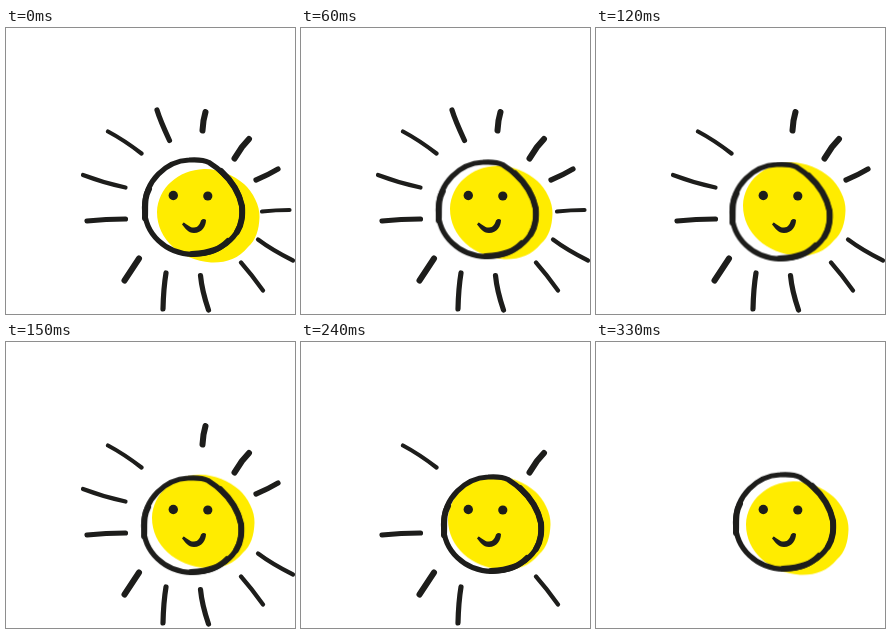
Recreate the animation shown at these times as an HTML page. Size 289 by 286 pixels, loop 360 ms.

```html
<!DOCTYPE html>
<html lang="en">
<head>
<meta charset="utf-8">
<title>Smiling sun</title>
<style>
  html, body { margin: 0; width: 100%; height: 100%; overflow: hidden; background: #fff; }
  svg { display: block; width: 100%; height: 100%; }

  .ink { fill: none; stroke: #1d1d1b; stroke-linecap: round; stroke-linejoin: round; }
  .thin { stroke-width: 4.2; }
  .bold { stroke-width: 5.2; }
  .heavy { stroke-width: 6; }

  .disc { fill: #ffec00; animation: disc 360ms infinite steps(6); }
  .ring { animation: ring 360ms infinite steps(4); }
  .short { animation: short 360ms infinite step-end; }
  .medium { animation: medium 360ms infinite step-end; }
  .long { animation: long 360ms infinite step-end; }

  @keyframes disc {
    0%, 100% { transform: translate(0, 0); }
    50% { transform: translate(-6px, -10px); }
  }
  @keyframes ring {
    0%, 100% { transform: translate(0, 0); }
    33.3333% { transform: translate(-2.5px, 4.5px); }
    66.6667% { transform: translate(4px, 3px); }
  }
  /* Rays vanish in three groups, a quarter loop apart */
  @keyframes short { 0% { opacity: 1; } 25%, 100% { opacity: 0; } }
  @keyframes medium { 0% { opacity: 1; } 50%, 100% { opacity: 0; } }
  @keyframes long { 0% { opacity: 1; } 75%, 100% { opacity: 0; } }
</style>
</head>
<body>
<svg viewBox="0 0 289 286" role="img" aria-label="Smiling sun">
  <path class="disc" d="M151 184C152 160 172 142 198 141C212 140.5 228 147 238 156
    C247 164 254 178 253.500 189C253 202 250 212 242 219C232 231 220 235 205 234.500
    C175 232 151 212 151 184Z"/>

  <g class="ink ring">
    <path class="bold" d="M203 134.500C197 131.500 190 131.500 183 132C160 133 139 153 138.500 179
      C138 206 160 226 187 226.500C210 226 236 212 236.200 184C236 166 224 148 203 134.500Z"/>
    <path class="heavy" d="M139 190C139.500 178 138 170 143 161M186 226C205 225 214 221 222 213
      M231 204C236.500 195 236.500 187 236 178C233 164 226 153 215 143"/>
  </g>

  <g class="ink short">
    <path class="bold" d="M151 82Q154 92 163.500 112.500"/>
    <path class="thin" d="M283.500 182Q270 182 256 183.500"/>
  </g>

  <g class="ink medium">
    <path class="thin" d="M119.500 159.500Q98 155 77 147M252 211.500Q266 222 287 232.500"/>
    <path class="bold" d="M272 141Q262 147 250 152M194.500 247.500Q196 263 202.500 282"/>
    <path class="heavy" d="M199.500 84Q197 92 196.500 102.500"/>
  </g>

  <g class="ink long">
    <path class="thin" d="M102 103.500Q118 112 135.500 125.500M235 234.500Q246 247 257 262.500"/>
    <path class="bold" d="M160 245Q157.500 260 157 281M119.500 191Q100 191 81 193"/>
    <path class="heavy" d="M243 111L236 119L228.500 130.500M133 230.500L118.500 252.500"/>
  </g>

  <g fill="#1d1d1b">
    <circle cx="167.300" cy="167.500" r="4.700"/>
    <circle cx="201.800" cy="168" r="4.600"/>
    <path d="M177.500 194.500C181 196 184 200 188 199.500C192 199.500 194 196 195 192.500
      Q197.500 190 200 192C200 198 196 205 188 205C182 205 179 200 176 196.500Z"/>
  </g>
</svg>
</body>
</html>
```
